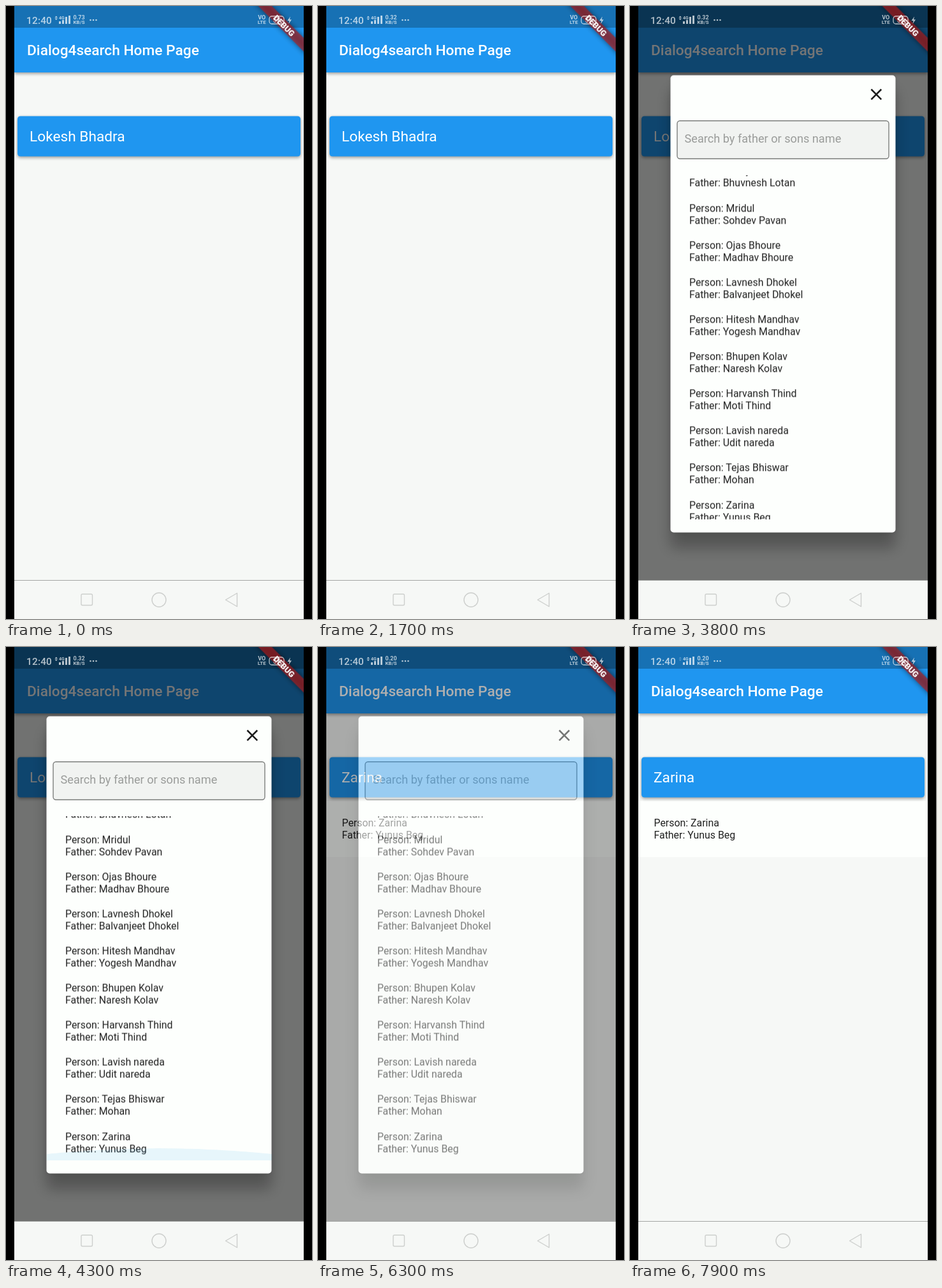
An HTML page that plays this animation: 480 px wide and 960 px high, repeating every 8000 ms.

```html
<!DOCTYPE html>
<html lang="en">
<head>
<meta charset="utf-8">
<title>Search dialog</title>
<style>
  html, body { margin: 0; width: 100%; height: 100%; overflow: hidden; background: #000; }
  svg { display: block; width: 480px; height: 960px; font-family: Roboto, sans-serif; }
  .anim { animation: 8s linear infinite; }

  .title { font-size: 22.7px; font-weight: 500; fill: #fff; }
  .choice { font-size: 22.7px; fill: #fff; }
  .row { font-size: 15.9px; fill: #212121; }
  .hint { font-size: 18.15px; fill: #9a9c9a; }
  .status { fill: #fff; opacity: .7; }
  .tiny { font-size: 8px; font-weight: 700; }
  .tiny .wide { font-size: 9px; }
  .nav { fill: none; stroke: #cdcfcd; stroke-width: 1.4; }
  .bar-shadow { filter: drop-shadow(0 2px 2.5px rgba(0, 0, 0, .38)); }
  .spot { filter: blur(11px); opacity: .27; }
  .ambient { filter: blur(4px); opacity: .1; }
  .banner-shadow { filter: blur(4px); opacity: .5; }
  .dot { fill: #fdfffd; fill-opacity: .85; stroke: #dde3e6; stroke-width: 1.8; }

  .dialog { animation-name: dialog; }
  .list { animation-name: scroll; }
  .glow { animation-name: glow; transform-origin: 240px 804px; }
  .step { animation-timing-function: step-end; }
  .before { animation-name: before; }
  .after { animation-name: after; }
  .tap-card { animation-name: tapCard; }
  .tap-row { animation-name: tapRow; }
  .speed1 { animation-name: speed1; }
  .speed2 { animation-name: speed2; }
  .speed3 { animation-name: speed3; }
  .arrows { animation-name: arrows; }

  @keyframes dialog {
    0%, 22.24% { opacity: 0; }
    22.25%, 78.1% { opacity: 1; }
    79.7%, 100% { opacity: 0; }
  }
  @keyframes scroll {
    0%, 38.2% { transform: translateY(0); animation-timing-function: cubic-bezier(.2, .5, .35, 1); }
    50%, 100% { transform: translateY(-738.6px); }
  }
  @keyframes glow {
    0%, 49% { transform: scaleY(0); opacity: 0; }
    50.5% { transform: scaleY(1.7); opacity: 1; }
    53.75% { transform: scaleY(1); opacity: 1; }
    58.75%, 100% { transform: scaleY(0); opacity: 0; }
  }
  @keyframes before { 0% { opacity: 1; } 78.1%, 100% { opacity: 0; } }
  @keyframes after { 0% { opacity: 0; } 78.1%, 100% { opacity: 1; } }
  @keyframes tapCard { 0% { opacity: 0; } 18.6% { opacity: .6; } 20.8%, 100% { opacity: 0; } }
  @keyframes tapRow { 0% { opacity: 0; } 76.1% { opacity: 1; } 78.2%, 100% { opacity: 0; } }
  @keyframes speed1 { 0% { opacity: 1; } 12.4%, 100% { opacity: 0; } }
  @keyframes speed2 { 0% { opacity: 0; } 12.4% { opacity: 1; } 64.9%, 100% { opacity: 0; } }
  @keyframes speed3 { 0% { opacity: 0; } 64.9%, 100% { opacity: 1; } }
  @keyframes arrows { 0% { opacity: 1; } 87.4%, 100% { opacity: .35; } }
</style>
</head>
<body>
<svg viewBox="0 0 480 960">
  <defs>
    <clipPath id="screen"><rect x="13" width="454" height="960"/></clipPath>
    <clipPath id="app"><rect x="13" width="454" height="899"/></clipPath>
    <clipPath id="viewport"><rect x="64" y="265" width="353" height="539"/></clipPath>
    <rect id="panel" x="63.5" y="108.5" width="353" height="716" rx="5"/>
    <rect id="ribbon" x="-60" y="35.3" width="120" height="15.1"/>
  </defs>
  <rect width="480" height="960"/>

  <g clip-path="url(#screen)">
    <rect x="13" width="454" height="960" fill="#f6f8f6"/>

    <!-- Home page -->
    <rect class="anim step after" x="13" y="241" width="454" height="88" fill="#fdfffd"/>
    <g class="bar-shadow">
      <rect x="13" width="454" height="104" fill="#1f96f0"/>
      <rect x="18" y="172.5" width="444" height="63" rx="4.5" fill="#1f96f0"/>
    </g>
    <rect x="13" width="454" height="34" opacity=".25"/>
    <text class="title" x="33" y="77">Dialog4search Home Page</text>
    <text class="choice anim step before" x="37" y="212">Lokesh Bhadra</text>
    <g class="anim step after">
      <text class="choice" x="37" y="212">Zarina</text>
      <text class="row" x="37.5" y="281">Person: Zarina</text>
      <text class="row" x="37.5" y="300">Father: Yunus Beg</text>
    </g>
    <circle class="dot anim step tap-card" cx="386" cy="222" r="13.5"/>
    <path d="M13 899.5H467" stroke="#a3a5a3"/>

    <!-- Search dialog -->
    <g class="anim dialog" clip-path="url(#app)">
      <rect x="13" width="454" height="900" opacity=".54"/>
      <use href="#panel" class="spot" y="24"/>
      <use href="#panel" class="ambient"/>
      <use href="#panel" fill="#fdfffd"/>
      <path d="M378.4 130.5l15.8 15.8m0-15.8l-15.8 15.8" stroke="#1b1b1b" stroke-width="2.5"/>
      <rect x="74" y="179.7" width="332" height="59.5" rx="4.5" fill="#f1f3f1" stroke="#7d7f7d" stroke-width="1.4"/>
      <text class="hint" x="85.5" y="213.5">Search by father or sons name</text>
      <g clip-path="url(#viewport)">
        <g id="list" class="anim list"></g>
        <path class="anim glow" d="M64 794Q240 776 417 794V804H64Z" fill="#2ba9e6" fill-opacity=".1"/>
      </g>
      <circle class="dot anim step tap-row" cx="228" cy="786.5" r="13.8"/>
    </g>

    <!-- Debug banner -->
    <g transform="translate(467 0) rotate(45)">
      <use href="#ribbon" class="banner-shadow"/>
      <use href="#ribbon" fill="#b71c1c" fill-opacity=".63"/>
      <text y="47.5" font-size="12.86" font-weight="900" text-anchor="middle" fill="#fff">DEBUG</text>
    </g>

    <!-- Status bar -->
    <g class="status">
      <text x="32" y="27.5" font-size="15.4" font-weight="500" letter-spacing=".2">12:40</text>
      <path class="anim step arrows" d="M76.5 18.3L78.8 15.5L81 18.3ZM76.5 19.5H81L78.8 22Z"/>
      <text x="83" y="20.5" font-size="7" font-weight="700">4G</text>
      <path d="M83 24h3v4h-3ZM88 22h3v6h-3ZM93 17h3v11h-3ZM98 15h3v13h-3Z"/>
      <g class="tiny">
        <text class="wide anim step speed1" x="105.5" y="21">0.73</text>
        <text class="wide anim step speed2" x="105.5" y="21">0.32</text>
        <text class="wide anim step speed3" x="105.5" y="21">0.20</text>
        <text x="105.5" y="28.2">KB/S</text>
        <text class="wide" x="401.3" y="21" text-anchor="middle">VO</text>
        <text x="401.3" y="28.3" text-anchor="middle">LTE</text>
      </g>
      <circle cx="132.5" cy="22" r="1.3"/>
      <circle cx="137" cy="22" r="1.3"/>
      <circle cx="141.5" cy="22" r="1.3"/>
      <rect x="413" y="16" width="23" height="12" rx="4" fill="none" stroke="#fff" stroke-width="1.3"/>
      <text x="424.5" y="25.6" font-size="10" font-weight="500" text-anchor="middle">57</text>
      <path d="M446 16.5L441.5 23H444.5L443.5 28L448 21.3H445Z"/>
    </g>

    <!-- Navigation bar -->
    <g class="nav">
      <rect x="118" y="921" width="17.5" height="17.5" rx="2"/>
      <circle cx="240" cy="930" r="11"/>
      <path d="M344.5 930L362.5 919.5V940.5Z" stroke-linejoin="round"/>
    </g>
  </g>
</svg>
<script>
  const people = [
    ["Hemu Bosal", "Gir Das Bosal"],
    ["Hemu Tarve", "Gir Das Tarve"],
    ["Lokesh Bhadra", "Guddu Bhadra"],
    ["Madan Sohra", "Bhikku Das Sohra"],
    ["Devnat tarve", "Sukhdas tarve"],
    ["Upkaresh Gohide", "Bhavesh Gohide"],
    ["Bhaveen Lotan", "Nekidas tarve"],
    ["Eklav bhanoti", "Mahant bhanoti"],
    ["Nitesh lotan", "Eklav bhanoti"],
    ["Prabhat Mohile", "Sumant Mohile"],
    ["Jivan Sohra", "Madho Sohra"],
    ["Kusum Gohide", "Bhanu Gohide"],
    ["Pinky Lotan", "Bhuvnesh Lotan"],
    ["Mridul", "Sohdev Pavan"],
    ["Ojas Bhoure", "Madhav Bhoure"],
    ["Lavnesh Dhokel", "Balvanjeet Dhokel"],
    ["Hitesh Mandhav", "Yogesh Mandhav"],
    ["Bhupen Kolav", "Naresh Kolav"],
    ["Harvansh Thind", "Moti Thind"],
    ["Lavish nareda", "Udit nareda"],
    ["Tejas Bhiswar", "Mohan"],
    ["Zarina", "Yunus Beg"]
  ];
  const rowHeight = 58.12;
  const line = (text, y) => `<text class="row" x="93" y="${y}">${text}</text>`;

  document.getElementById("list").innerHTML = people.map(([person, father], i) => {
    const y = 290 + i * rowHeight;
    return line(`Person: ${person}`, y) + line(`Father: ${father}`, y + 19);
  }).join("");
</script>
</body>
</html>
```
